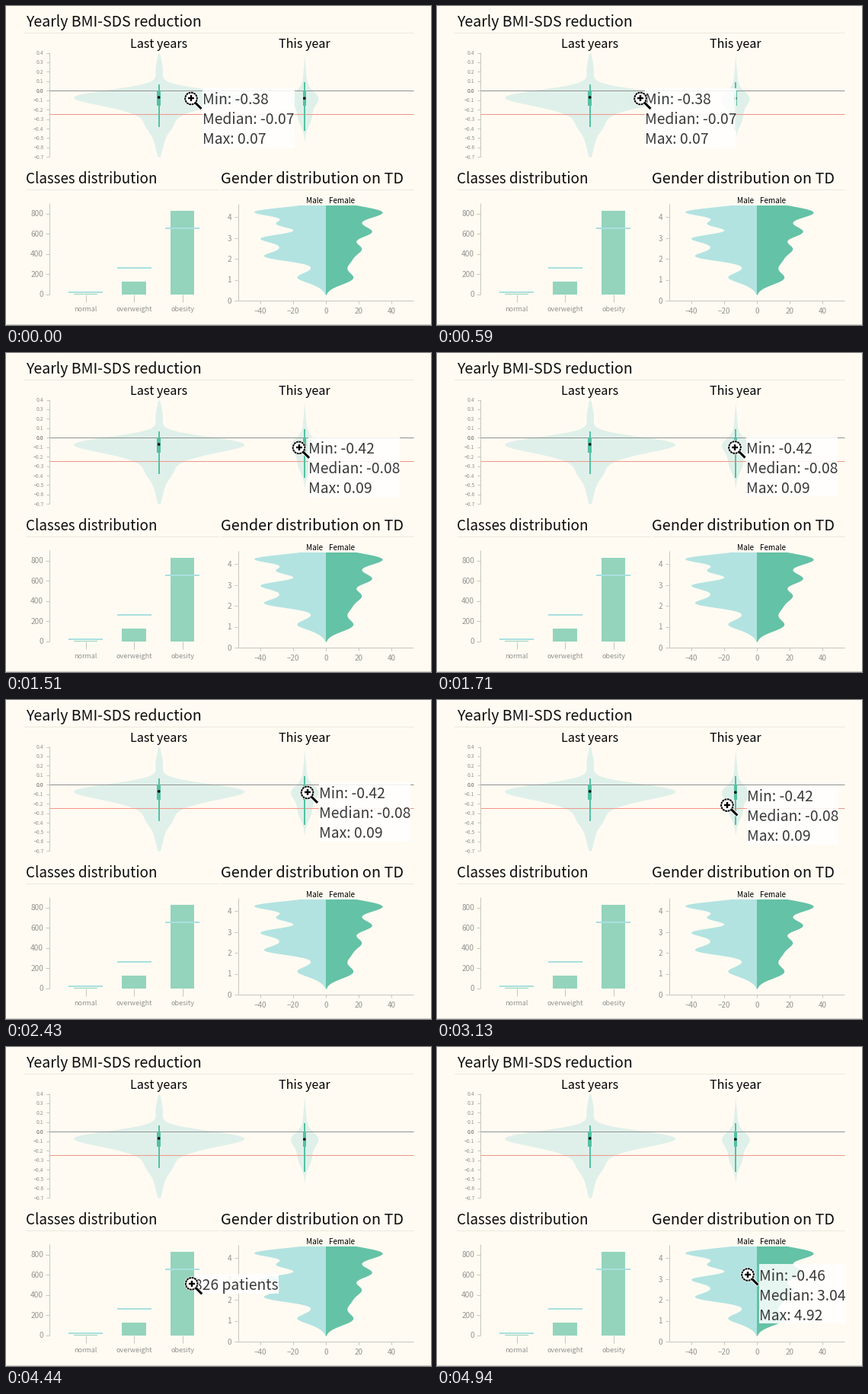
Animation, 558 px wide and 419 px high, one loop 5.7 s. Source, as a matplotlib script:

```python
import numpy as np
import matplotlib.pyplot as plt
from matplotlib.animation import FuncAnimation
from matplotlib.patches import Circle, Rectangle

W, H, DPI = 558, 419, 72
LOOP, INTERVAL = 5700, 30
CREAM, INK, GREY, AXIS = "#fffbf2", "#0c0c0c", "#949490", "#c9c6bf"
PALE, TEAL, BAR, CYAN = "#dff0ea", "#55c0a2", "#94d4bc", "#a9dfdf"
MALE, FEMALE = "#b2e3e1", "#64c2a6"

plt.rcParams["font.family"] = "Noto Sans CJK JP"
fig = plt.figure(figsize=(W / DPI + 1e-6, H / DPI + 1e-6), dpi=DPI, facecolor=CREAM)
ax = fig.add_axes([0, 0, 1, 1])
ax.set(xlim=(0, W), ylim=(H, 0))
ax.axis("off")


def label(x, y, s, size, color=INK, ha="left", z=5):
    return ax.text(x, y, s, size=size, color=color, ha=ha, va="baseline", zorder=z)


def line(x0, y0, x1, y1, color=AXIS, lw=1, z=3):
    return ax.plot([x0, x1], [y0, y1], color=color, lw=lw, zorder=z,
                   solid_capstyle="butt")[0]


def box(x0, y0, x1, y1, color, z=2, **kw):
    return ax.add_patch(Rectangle((x0, y0), x1 - x0, y1 - y0, fc=color, lw=0, zorder=z, **kw))


def disc(x, y, r, color, z, **kw):
    return ax.add_patch(Circle((x, y), r, fc=color, zorder=z, **kw))


def density(top, bottom, bumps, bandwidth):
    """Half width along y: equal Gaussian kernels of given (centre, height)."""
    y = np.linspace(top, bottom, 300)
    return y, sum(h * np.exp(-((y - c) / bandwidth) ** 2 / 2) for c, h in bumps)


def signed(v, decimals=0):
    return f"{v:.{decimals}f}".replace("-", "\u2212")


def heading(x0, x1, xt, base, s, size):
    label(xt, base, s, size)
    line(x0, base + 8.5, x1, base + 8.5, "#ece8df")


def sds(v):
    return 111.3 - 124.4 * v


def violin(cx, shape, low, mid, high, half):
    y, w = shape
    ax.fill_betweenx(y, cx - w, cx + w, color=PALE, lw=0, zorder=1)
    line(cx, sds(low), cx, sds(high), TEAL, 2, 4)
    box(cx - half, 111, cx + half, 131.5, TEAL, 4)
    disc(cx, sds(mid), 1.8, "black", 5, lw=0)


# stage border
line(W - 0.5, 0, W - 0.5, H, "#cfccc5")
line(0, H - 0.5, W, H - 0.5, "#cfccc5")

# yearly reduction
heading(23, 535, 26, 27, "Yearly BMI-SDS reduction", 19.5)
label(200.5, 55, "Last years", 16.1, "black", "center")
label(392, 55, "This year", 16.1, "black", "center")
line(56.5, 61, 56.5, 198.5)
for k in range(4, -8, -1):
    y = sds(k / 10)
    line(53, y, 57, y)
    label(49.5, y + 2.5, signed(k / 10, 1), 6.8, "#62625f" if k == 0 else GREY, "right")
violin(200.7, density(62, 198, [(72, 2), (86, 4), (118, 97), (131, 36), (143, 10),
                                (157, 14), (173, 5), (188, 3)], 9), -0.38, -0.07, 0.07, 2.6)
violin(391.8, density(66, 177, [(84, 1.2), (100, 2), (120, 16), (133, 5),
                                (147, 7), (160, 1.5)], 9), -0.42, -0.08, 0.09, 2)
line(57, 111.5, 535, 111.5, "#929290")
line(57, 142.5, 535, 142.5, "#f09586")

# classes
heading(26, 280, 26, 233, "Classes distribution", 18.8)
line(56.5, 259, 56.5, 379)


def count(v):
    return 378.7 - v * 0.1325


for v in range(0, 1000, 200):
    line(52, count(v), 57, count(v))
    label(49, count(v) + 3.5, str(v), 10.1, GREY, "right")
for k, (name, n, ref) in enumerate([("normal", 2, 20), ("overweight", 124, 261),
                                    ("obesity", 826, 653)]):
    cx = 104.5 + 63.5 * k
    box(cx - 15.7, count(n), cx + 15.7, 379, BAR)
    line(cx - 22.5, count(ref), cx + 22.5, count(ref), CYAN, 2)
    line(cx, 379, cx, 389)
    label(cx, 401, name, 9, GREY, "center")

# gender
heading(282, 535, 282, 233, "Gender distribution on TD", 19.9)
line(304.5, 260, 304.5, 387.5)
line(304, 387.5, 535, 387.5)
for v in range(5):
    y = 387 - 27.4 * v
    line(300, y, 304, y)
    label(296, y + 3.7, str(v), 10, GREY, "right")
for v in range(-40, 41, 20):
    x = 420 + 2.15 * v
    line(x, 387, x, 391)
    label(x, 403.7, signed(v), 9.8, GREY, "center")
label(416, 259, "Male", 10, "black", "right")
label(423.5, 259, "Female", 10, "black")
male = density(261.5, 379, [(270, 92), (286, 62), (304.5, 80), (317, 42), (329, 74),
                            (344, 12), (356, 34), (366, 8)], 6)
female = density(261.5, 379, [(270, 70), (284, 18), (297, 54), (318, 42), (334, 25),
                              (346, 10), (358, 32)], 8)
for (y, w), side, color in [(male, -1, MALE), (female, 1, FEMALE)]:
    ax.fill_betweenx(y, 419.5, 419.5 + side * w, color=color, lw=0, zorder=1)

# hover zones: x0, y0, x1, y1, tooltip lines
ZONES = [
    (90, 62, 312, 198, ["Min: -0.38", "Median: -0.07", "Max: 0.07"]),
    (375, 66, 410, 177, ["Min: -0.42", "Median: -0.08", "Max: 0.09"]),
    (216, 269, 247, 379, ["826 patients"]),
    (330, 262, 491, 379, ["Min: -0.46", "Median: 3.04", "Max: 4.92"]),
]


def linear(u):
    return u


def speed_up(u):
    return u ** 2.67


def smooth(u):
    return u * u * (3 - 2 * u)


# pointer moves: first and last visible step, step count, goal, easing
HOME = np.array([243, 121.5])
MOVES = [
    (390, 890, 6, (364, 121.5), speed_up),
    (990, 1310, 4, (381, 124.5), linear),
    (1510, 1710, 3, (391, 124), smooth),
    (2310, 2430, 2, (395.5, 121.5), linear),
    (3130, 3630, 6, (228, 312), smooth),
    (4440, 4940, 6, (408, 299), smooth),
]
STEPS = np.concatenate([[0]] + [np.linspace(a, b, n) for a, b, n, *_ in MOVES])
LAG, TIP_DX, TIP_SIZE, LEADING = 50, 15, 19.3, 26


def pointer(t):
    pos = HOME
    for first, last, _, goal, ease in MOVES:
        start, end = first - 2 * LAG, last - LAG
        u = np.clip((t - start) / (end - start), 0, 1)
        pos = pos + (np.array(goal) - pos) * ease(u)
    return pos


def zone_at(x, y):
    for x0, y0, x1, y1, rows in ZONES:
        if x0 <= x <= x1 and y0 <= y <= y1:
            return rows
    return []


tip_box = box(0, 0, 1, 1, "white", 8, alpha=0.86)
tip_rows = [label(0, 0, "", TIP_SIZE, "#3a3a3a", z=9) for _ in range(3)]


def text_width(s):
    tip_rows[0].set_text(s)
    return tip_rows[0].get_window_extent().width


WIDTHS = {rows[0]: max(map(text_width, rows)) for *_, rows in ZONES}

# magnifier
lens = disc(0, 0, 9.4, "white", 11, lw=0)
ring = disc(0, 0, 7.8, "white", 13, ec="black", lw=2, ls=(0, (1.4, 0.35)))
strokes = [(line(0, 0, 0, 0, c, lw, z), np.array(dx), np.array(dy)) for c, lw, z, dx, dy in [
    ("white", 5, 10, (5, 14), (5, 14)),
    ("black", 3, 12, (5.5, 13.5), (5.5, 13.5)),
    ("black", 2.4, 14, (-4, 4), (0, 0)),
    ("black", 2.4, 14, (0, 0), (-4, 4)),
]]


def draw(i):
    now = i * INTERVAL + 20
    t = STEPS[STEPS <= now][-1]
    x, y = pointer(t)
    lens.center = ring.center = (x, y)
    for art, dx, dy in strokes:
        art.set_data(x + dx, y + dy)

    rows = zone_at(x, y)
    tx, ty = pointer(t - LAG) + (TIP_DX, 0)
    tip_box.set_visible(bool(rows))
    if rows:
        tip_box.set_bounds(tx, ty - 13.5, WIDTHS[rows[0]], LEADING * len(rows))
    for k, art in enumerate(tip_rows):
        art.set_text(rows[k] if k < len(rows) else "")
        art.set_position((tx, ty + 7.5 + LEADING * k))
    return [tip_box, *tip_rows, lens, ring, *(s[0] for s in strokes)]


anim = FuncAnimation(fig, draw, frames=LOOP // INTERVAL, interval=INTERVAL,
                     repeat=True, repeat_delay=0, blit=False)
plt.show()
```
